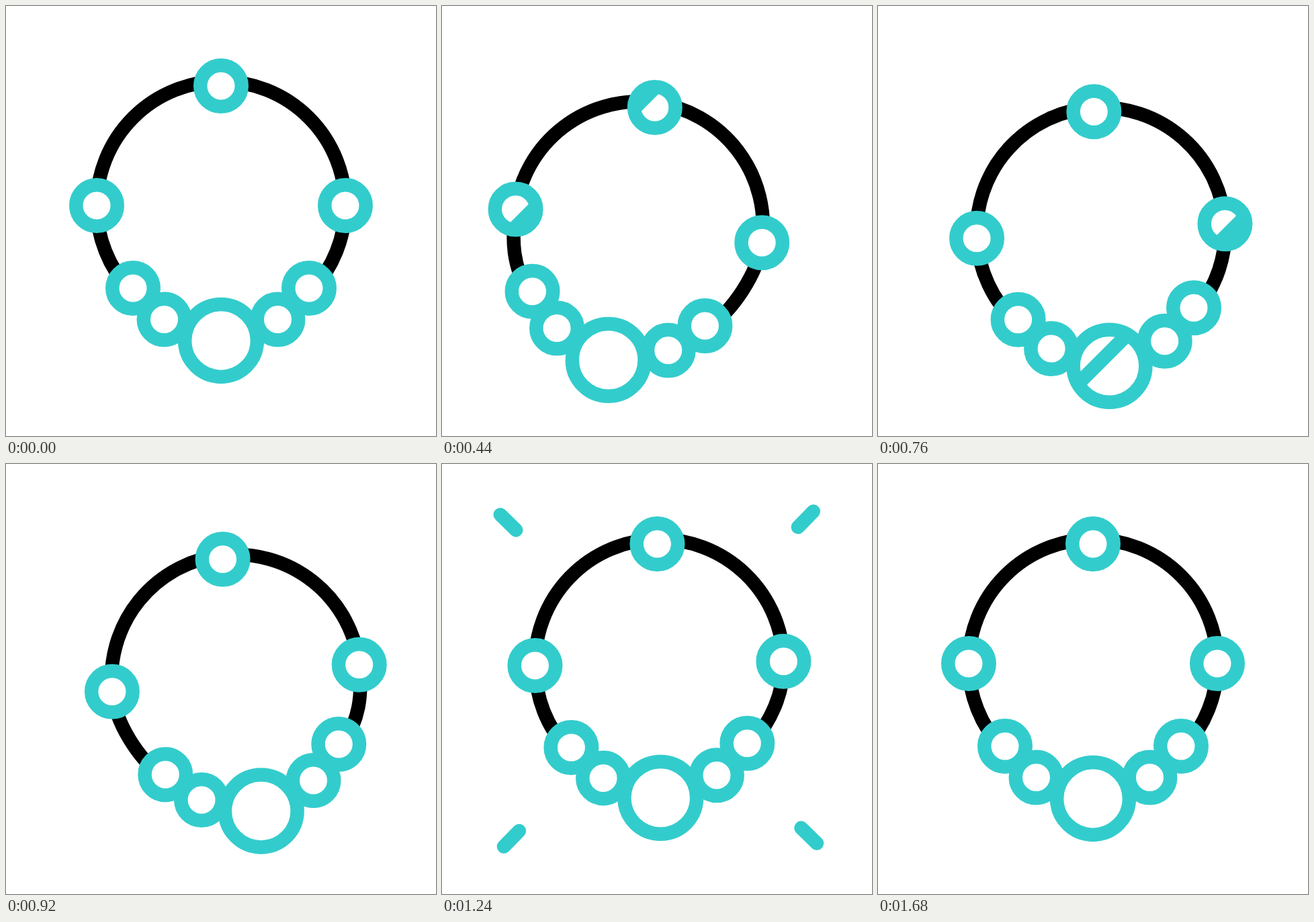
An HTML page that plays this animation: 640 px wide and 640 px high, repeating every 1.72 s.

```html
<!DOCTYPE html>
<html lang="en">
<head>
<meta charset="utf-8">
<title>Necklace</title>
<style>
  html, body { margin: 0; width: 100%; height: 100%; overflow: hidden; background: #fff; }
  svg { display: block; width: 100vw; height: 100vh; }
</style>
</head>
<body>
<svg id="stage" viewBox="0 0 640 640">
  <defs><clipPath id="holes"></clipPath></defs>
  <path id="cord" fill="none" stroke="#000" stroke-width="20.5"/>
  <g id="beads" fill="#fff" stroke="#3cc" stroke-width="20.5"></g>
  <g clip-path="url(#holes)">
    <path id="shine" stroke="#3cc" stroke-width="20.9"/>
  </g>
  <path id="rays" fill="none" stroke="#3cc" stroke-width="20.5" stroke-linecap="round"/>
</svg>
<script>
const STEP = 40, LOOP = 1720;
const PIVOT = [320, 95];
const LOW = [320, 454.2];
const HUB = [320, 297], R = 185;
const NS = 'http://www.w3.org/2000/svg';
const $ = id => document.getElementById(id);

// Keys: [step, value], eased in and out between neighbours
const DROP = [[4, 0], [14, 41], [17, 41], [30, 0]];
const SWING = [[1, 0], [10.4, 7.72], [12.7, 7.72], [21.6, -6.2], [25, -6.2], [33, 0]];
const TWIST = [[3, 0], [13, 4], [24, -3.9], [25, -3.9], [34, 0.8], [42, 0]];
const SLIDE_X = [[3, 0], [13, -17], [24, 14.2], [25, 14.2], [34, -7.5], [42, 0]];
const SLIDE_Y = [[4, 0], [12, 3.1], [20, 0], [34, -1.3], [42, 0]];
const RAY_HEAD = [[24, 168], [33.2, 244]];
const RAY_TAIL = [[25.4, 168], [35.9, 244]];

// x, y, radius, hangs on the loose lower part
const BEADS = [
  [320, 119, 30.75, false], [135, 297, 30.75, false], [505, 297, 30.75, false],
  [189, 420, 30.75, true], [451, 420, 30.75, true],
  [235.5, 466.5, 30.75, true], [404.5, 466.5, 30.75, true],
  [320, 498, 53.9, true]
];

function track(keys, n) {
  if (n <= keys[0][0]) return keys[0][1];
  for (let i = 1; i < keys.length; i++) {
    const [a, v] = keys[i - 1], [b, w] = keys[i];
    if (n < b) {
      const u = (n - a) / (b - a);
      return v + (w - v) * u * u * (3 - 2 * u);
    }
  }
  return keys[keys.length - 1][1];
}

function turn([x, y], [cx, cy], deg, dx, dy) {
  const a = deg * Math.PI / 180, c = Math.cos(a), s = Math.sin(a);
  return [cx + (x - cx) * c - (y - cy) * s + dx, cy + (x - cx) * s + (y - cy) * c + dy];
}

const fmt = p => p[0].toFixed(2) + ' ' + p[1].toFixed(2);

function circle(parent, r) {
  const el = document.createElementNS(NS, 'circle');
  el.setAttribute('r', r);
  parent.appendChild(el);
  return el;
}

const parts = BEADS.map(b => [circle($('beads'), b[2]), circle($('holes'), b[2] - 9)]);

function cordPath(upper, lower) {
  const arc = 43.2 * Math.PI / 180;
  const h = 4 / 3 * Math.tan(arc / 4) * R;
  const c = Math.cos(arc), s = Math.sin(arc);
  const at = (x, y) => [HUB[0] + x, HUB[1] + y];
  const side = k => ({
    top: upper(at(k * R, 0)),
    out: upper(at(k * R, h)),
    in: lower(at(k * (R * c + h * s), R * s - h * c)),
    end: lower(at(k * R * c, R * s))
  });
  const l = side(-1), r = side(1);
  return `M${fmt(l.end)}C${fmt(l.in)} ${fmt(l.out)} ${fmt(l.top)}` +
    `A${R} ${R} 0 0 1 ${fmt(r.top)}C${fmt(r.out)} ${fmt(r.in)} ${fmt(r.end)}`;
}

function rayPath(n, swing, drop) {
  if (n < 24.5 || n > 35.5) return '';
  const head = track(RAY_HEAD, n), tail = track(RAY_TAIL, n);
  let d = '';
  for (const kx of [-1, 1]) for (const ky of [-1, 1]) {
    const at = v => fmt(turn([320 + kx * v, 320 + ky * (v + 14)], PIVOT, swing * 0.62, 0, drop));
    d += `M${at(tail)}L${at(head)}`;
  }
  return d;
}

function draw(ms) {
  const n = Math.floor((ms % LOOP) / STEP);
  const drop = track(DROP, n), swing = track(SWING, n), twist = track(TWIST, n);
  const sx = track(SLIDE_X, n), sy = track(SLIDE_Y, n);
  const upper = p => turn(p, PIVOT, swing, 0, drop);
  const lower = p => upper(turn(p, LOW, twist, sx, sy));

  BEADS.forEach(([x, y, , loose], i) => {
    const [px, py] = (loose ? lower : upper)([x, y]);
    for (const el of parts[i]) {
      el.setAttribute('cx', px.toFixed(2));
      el.setAttribute('cy', py.toFixed(2));
    }
  });
  $('cord').setAttribute('d', cordPath(upper, lower));
  $('rays').setAttribute('d', rayPath(n, swing, drop));

  // Diagonal glint crossing the stage at constant speed
  const m = (438.5 + 52.7 * (n - 11)) / 2;
  $('shine').setAttribute('d', `M${m - 700} ${m + 700}L${m + 700} ${m - 700}`);
}

const start = performance.now();
function tick(now) {
  draw(Math.max(0, now - start));
  requestAnimationFrame(tick);
}
draw(0);
requestAnimationFrame(tick);
</script>
</body>
</html>
```
